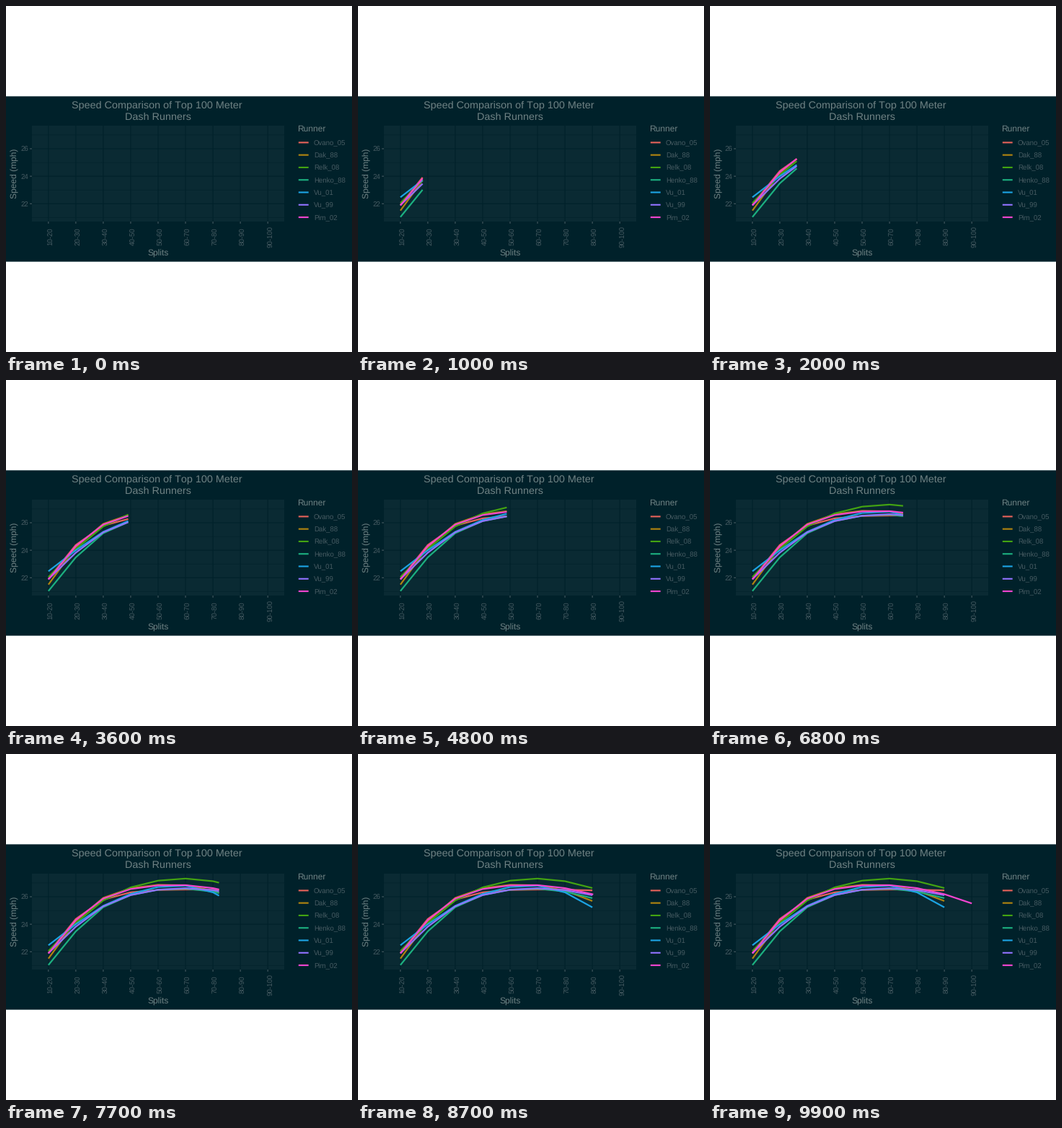
A matplotlib script that plays this animation: 480 px wide and 480 px high, repeating every 10 s.

```python
import numpy as np
import matplotlib.pyplot as plt
from matplotlib.animation import FuncAnimation
from matplotlib.patches import Rectangle

plt.rcParams.update({
    "font.family": "Liberation Sans",
    "text.hinting": "none",
    "text.kerning_factor": 6,  # practically no kerning
})

SIZE, DPI = 480, 72
FRAMES, INTERVAL = 100, 100

BG, PANEL = "#00212a", "#0a2a33"
TITLE, MUTED = "#708284", "#475b62"

# panel edges in pixels
LEFT, RIGHT, TOP, BOTTOM = 36, 386, 166, 299
STEP = (RIGHT - LEFT) / 9.2
LAST = 8

# name, colour, last split, then start speed, top speed, rise and fade
RUNNERS = [
    ("Ovano_05", "#e8625a", 7, (21.92, 26.55, 0.76, 0.008)),
    ("Dak_88", "#b08410", 7, (21.50, 26.98, 0.69, 0.115)),
    ("Relk_08", "#43a312", 7, (22.05, 27.58, 0.46, 0.082)),
    ("Henko_88", "#1cb080", 7, (21.03, 26.75, 0.56, 0.075)),
    ("Vu_01", "#1ca4e4", 7, (22.47, 27.25, 0.385, 0.175)),
    ("Vu_99", "#9072ff", 7, (21.89, 26.80, 0.50, 0.06)),
    ("Pim_02", "#f245d0", 8, (21.87, 26.95, 0.65, 0.068)),
]


def speed(k, start, top, rise, fade):
    """Approach the top speed, then tire after the fifth split."""
    gain = (top - start) * np.exp(-rise * k ** 1.25)
    return top - gain - fade * np.maximum(k - 4, 0) ** 2.2


def px(split):
    return LEFT + STEP * (split + 0.6)


def py(mph):
    return 198 + 19.07 * (26 - mph)


fig = plt.figure(figsize=(SIZE / DPI, SIZE / DPI), dpi=DPI, facecolor="white")
ax = fig.add_axes([0, 0, 1, 1])
ax.set_xlim(0, SIZE)
ax.set_ylim(SIZE, 0)
ax.axis("off")


def box(x0, y0, x1, y1, color):
    ax.add_patch(Rectangle((x0, y0), x1 - x0, y1 - y0, color=color, lw=0,
                           zorder=0, snap=False))


def rule(xs, ys, color, width):
    ax.plot(xs, ys, color=color, lw=width, solid_capstyle="butt",
            zorder=1, snap=False)


def label(x, y, text, size, color, ha="left", angle=0):
    ax.text(x, y, text, size=size, color=color, ha=ha, va="baseline",
            rotation=angle, rotation_mode="anchor")


box(0, 125.3, SIZE, 354.7, BG)
box(LEFT, TOP, RIGHT, BOTTOM, PANEL)

for mph in range(21, 28):
    y, major = py(mph), mph % 2 == 0
    rule([LEFT, RIGHT], [y, y], BG, 1.07 if major else 0.53)
    if major:
        rule([LEFT - 3, LEFT], [y, y], MUTED, 1.07)
        label(LEFT - 5.2, y + 3.5, str(mph), 9.6, MUTED, "right")

for k in range(LAST + 1):
    x = px(k)
    rule([x, x], [TOP, BOTTOM], BG, 1.07)
    rule([x, x], [BOTTOM, BOTTOM + 3], MUTED, 1.07)
    label(x + 6.8, 320, f"{10 * k + 10}-{10 * k + 20}", 9.6, MUTED, "center", 90)

mid = (LEFT + RIGHT) / 2
label(mid - 2, 142.2, "Speed Comparison of Top 100 Meter", 14.4, TITLE, "center")
label(mid, 157.8, "Dash Runners", 14.4, TITLE, "center")
label(mid, 347, "Splits", 12, TITLE, "center")
label(15.2, 232.8, "Speed (mph)", 12, TITLE, "center", 90)

label(404, 174, "Runner", 12, TITLE)
lines = []
for i, (name, color, *_) in enumerate(RUNNERS):
    y = 189.4 + 17.28 * i
    rule([405.8, 419.7], [y, y], color, 2.13)
    label(427, y + 3.5, name, 9.6, MUTED)
    lines += ax.plot([], [], color=color, lw=2.2, zorder=3 + i / 10,
                     solid_capstyle="butt", solid_joinstyle="round")


def update(i):
    reach = LAST * i / (FRAMES - 1)
    for line, (_, _, last, pace) in zip(lines, RUNNERS):
        end = min(reach, last)
        nodes = np.arange(last + 1)
        splits = np.append(np.arange(np.ceil(end)), end)
        mph = np.interp(splits, nodes, speed(nodes, *pace))
        line.set_data(px(splits), py(mph))
    return lines


anim = FuncAnimation(fig, update, frames=FRAMES, interval=INTERVAL,
                     repeat=True, repeat_delay=0, blit=False)
plt.show()
```
